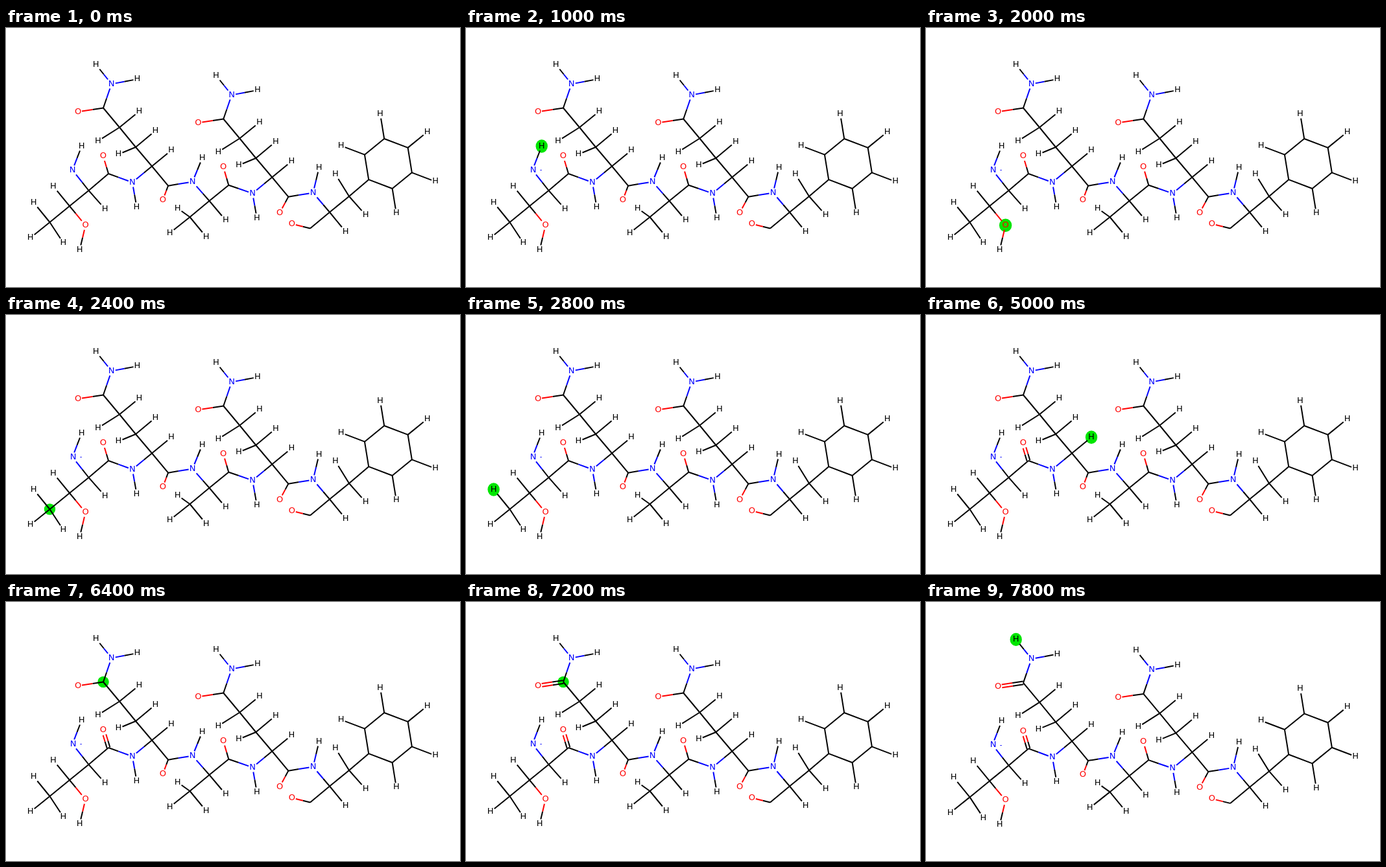
Recreate the animation shown at these times as an HTML page. Size 700 by 400 pixels, loop 8 s.

```html
<!DOCTYPE html>
<html lang="en">
<head>
<meta charset="utf-8">
<title>Peptide walk</title>
<style>
  html, body { margin: 0; width: 100%; height: 100%; overflow: hidden; background: #fff; }
  svg { display: block; width: 700px; height: 400px; }
  line { stroke-width: 2; }
  text { font: 13px "DejaVu Sans", sans-serif; text-anchor: middle; }
</style>
</head>
<body>
<svg id="stage" viewBox="0 0 700 400"></svg>
<script>
const STEP = 200, STEPS = 40;
const COLORS = { N: '#0000ff', O: '#ff0000', H: '#000', C: '#000' };
const GREEN = '#00e600';
const atoms = {}, bonds = [];

// Each entry: name x y parent. The first letter of the name is the element.
function residue(prefix, spec, dx = 0, dy = 0) {
  for (const entry of spec.split(',')) {
    const [name, x, y, parent] = entry.trim().split(/\s+/);
    atoms[prefix + name] = { el: name[0], x: +x + dx, y: +y + dy };
    if (parent) bonds.push([prefix + parent, prefix + name]);
  }
}

const glutamine = `N 194.8 238.5, HN 201.5 276.3 N, CA 225 213.5 N, HA 255 188.7 CA,
  CB 200 184 CA, H1 173.5 195 CB, H2 230.5 158.5 CB, CG 175 153.5 CB,
  H3 142 174.5 CG, H4 205.5 128.5 CG, CD 150 123.5 CG, OE 111 129.3 CD,
  NE 162.7 86.5 CD, H5 138.7 56.5 NE, H6 202.5 79 NE, C 250 243.7 CA`;

residue('a', `N 102.5 219.3, HN 116.7 182.5 N, CA 127.5 251 N, HA 152.6 279.5 CA,
  CB 98 275 CA, HB 73 244.5 CB, OG 122.6 304.8 CB, HG 113.6 342.5 OG, CG 67.5 300 CB,
  H1 88.5 332 CG, H2 42.6 269.5 CG, H3 37.7 324 CG, C 158 225 CA, O 149.8 198 C`);
residue('b', glutamine);
residue('b', 'O 241.8 265.7 C');
residue('c', `N 287.6 237.5, HN 302.7 200.5 N, CA 313.5 267 N, HA 338.8 297 CA,
  CB 283.5 292 CA, H1 264.6 278.5 CB, H2 252.7 316.5 CB, H3 308.6 322.5 CB,
  C 343.3 242.7 CA, O 335 214.5 C`);
residue('d', glutamine, 185.3, 17);
residue('d', 'O 422 285.5 C');
residue('e', `N 473.5 254.5, HN 482.7 215.5 N, CA 499 284.5 N, HA 523.6 314.5 CA,
  CB 529 260 CA, H1 508 226 CB, H2 554.6 289 CB, C 469 309.5 CA, O 440.8 302.5 C`);
for (const link of ['ab', 'bc', 'cd', 'de']) bonds.push([link[0] + 'C', link[1] + 'N']);

// Phenyl ring, its last corner but one joined to the side chain.
for (let i = 0; i < 6; i++) {
  const angle = (-99.2 + 60 * i) * Math.PI / 180;
  const at = r => `${589.4 + r * Math.cos(angle)} ${209.5 + r * Math.sin(angle)}`;
  residue('r', `C${i} ${at(39)}`);
  if (i !== 4) residue('r', `H${i} ${at(77.8)} C${i}`);
  bonds.push(['rC' + i, 'rC' + (i + 1) % 6]);
}
bonds.push(['eCB', 'rC4']);

// Depth-first visit; atoms lacking valence look at their neighbours and return.
const tour = `- aN aHN aCA aN aHN aCA aHA aCB aHB aOG aHG aCG aH1 aH2 aH3
  aC aCA aO aN2 aC aO bN bHN bCA bHA bCB bH1 bH2 bCG bH3 bH4
  bCD bCG bOE bNE bCD bOE bNE bH5`.replace('aN2', 'bN').split(/\s+/);
const CHARGE_STEP = 4;
const doubleFrom = { aCaO: 20, bCDbOE: 36 };

// Room made at the margin when an outermost atom is marked.
const squeeze = 1 - 1.4 / 630;
const nudges = {
  11: 'translate(0 -1.4)',
  15: `translate(${667 * (1 - squeeze)} ${200 * (1 - squeeze)}) scale(${squeeze})`,
  39: 'translate(0 1.4)'
};

// Distance from an atom to the edge of its label box along a unit direction.
const gap = (atom, ux, uy) =>
  atom.el === 'C' ? 0 : Math.min(6 / Math.abs(ux), 7 / Math.abs(uy));

const line = (x1, y1, x2, y2, color) =>
  `<line x1="${x1}" y1="${y1}" x2="${x2}" y2="${y2}" stroke="${color}"/>`;

function drawBond([from, to], step) {
  const p = atoms[from], q = atoms[to];
  const length = Math.hypot(q.x - p.x, q.y - p.y);
  const ux = (q.x - p.x) / length, uy = (q.y - p.y) / length;
  const start = gap(p, ux, uy), end = length - gap(q, ux, uy), mid = (start + end) / 2;
  const offsets = step >= doubleFrom[from + to] ? [-2.4, 2.4] : [0];
  return offsets.map(o => {
    const part = (a, b, color) => line(
      p.x + ux * a - uy * o, p.y + uy * a + ux * o,
      p.x + ux * b - uy * o, p.y + uy * b + ux * o, color);
    const c1 = COLORS[p.el], c2 = COLORS[q.el];
    return c1 === c2 ? part(start, end, c1) : part(start, mid, c1) + part(mid, end, c2);
  }).join('');
}

function drawLabel([name, { el, x, y }], step) {
  if (el === 'C') return '';
  const charged = name === 'aN' && step >= CHARGE_STEP;
  const label = `<text x="${x + (charged ? 1 : 0)}" y="${y + 3.2}" fill="${COLORS[el]}">${el}</text>`;
  return charged
    ? label + `<text x="115.5" y="222.3" style="font-size:10px" fill="${COLORS.N}">-</text>`
    : label;
}

function drawMark(atom) {
  if (!atom) return '';
  const [rx, ry] = { C: [8.7, 8.7], H: [9.2, 10.2], O: [9.7, 10.2], N: [10.3, 10.2] }[atom.el];
  return `<ellipse cx="${atom.x}" cy="${atom.y}" rx="${rx}" ry="${ry}" fill="${GREEN}"/>`;
}

const stage = document.getElementById('stage');
let shown = -1;

function render(now) {
  const step = Math.floor(now / STEP) % STEPS;
  if (step !== shown) {
    shown = step;
    stage.innerHTML = `<g transform="${nudges[step] || 'translate(0 0)'}">` +
      drawMark(atoms[tour[step]]) +
      bonds.map(b => drawBond(b, step)).join('') +
      Object.entries(atoms).map(a => drawLabel(a, step)).join('') + '</g>';
  }
  requestAnimationFrame(() => render(performance.now() - origin));
}

const origin = performance.now();
render(0);
</script>
</body>
</html>
```
